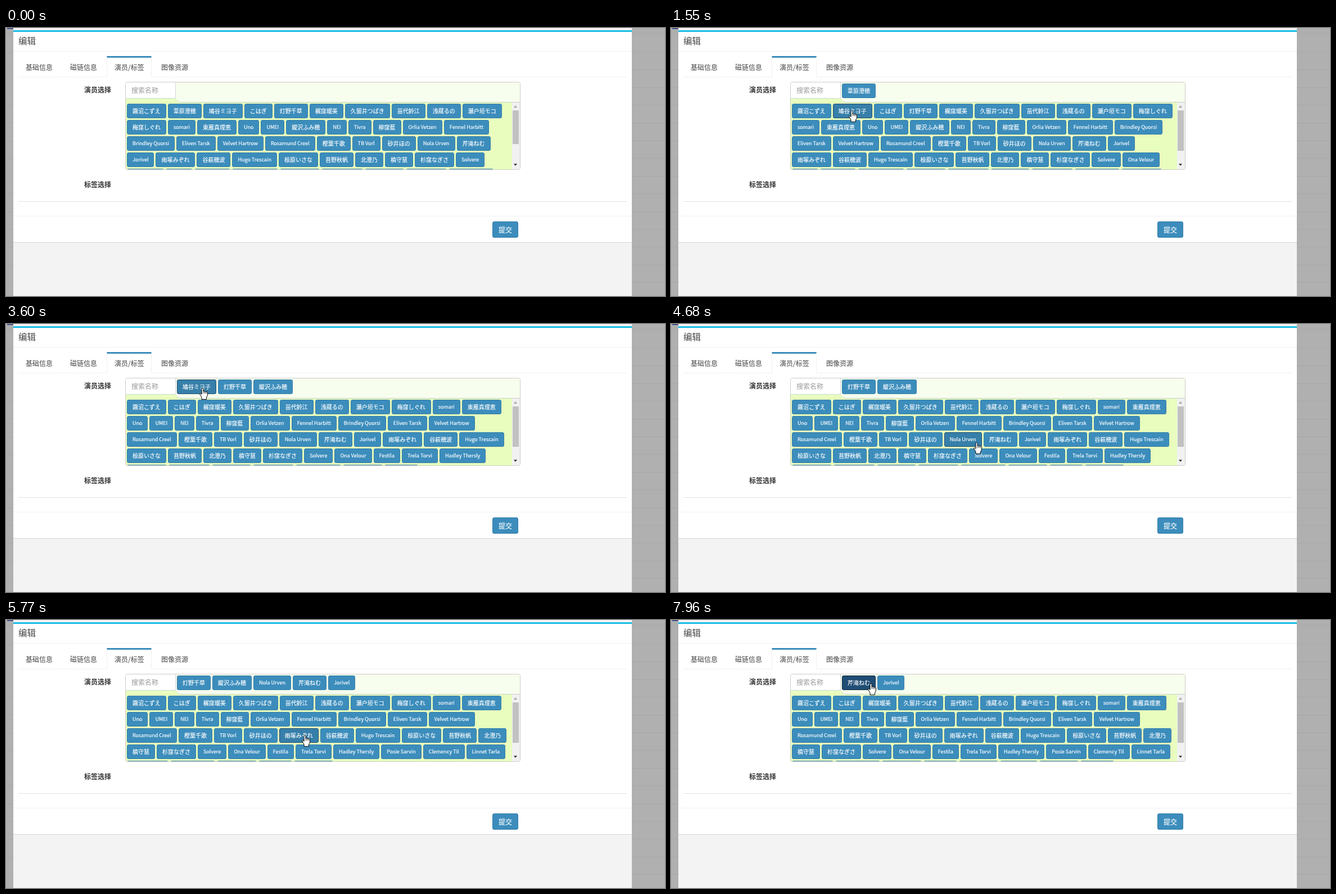
An HTML page that plays this animation: 1172 by 478 pixels, repeating every 8000 ms.

```html
<!DOCTYPE html>
<html lang="zh-CN">
<head>
<meta charset="utf-8">
<title>编辑</title>
<style>
html, body { margin: 0; width: 100%; height: 100%; overflow: hidden; }
body {
  position: relative;
  font: 12px/20px "Noto Sans CJK SC", "Noto Sans CJK JP", "Noto Sans CJK", sans-serif;
  color: #444;
  background: repeating-linear-gradient(#a8a8a8 0 1px, #b0b0b0 1px 31.6px) 0 11px;
}
body * { position: absolute; box-sizing: border-box; white-space: nowrap; }
script { display: none; }
.scrap { left: 2px; top: 0; width: 11px; height: 2px; background: #46538a; }
.page { left: 13px; top: 0; width: 1100px; height: 478px; background: #f3f3f3; }
.card {
  left: 13px; top: 4px; width: 1100px; height: 379px; background: #fff;
  border-top: 3px solid #18bfe6; border-bottom: 1px solid #d6d6d6;
}
.rule { height: 1px; background: #f1f1f1; }
.wide { left: 13px; width: 1100px; }
.inner { left: 22px; width: 1082px; }
.title { left: 22px; top: 12px; font-size: 15.5px; }
.tab { left: 179px; top: 50px; width: 80px; height: 38px; background: #fff;
  border: 1px solid #f1f1f1; border-top: 3px solid #3c8dbc; border-bottom: 0; }
.label { left: 139px; color: #333; font-weight: 700; }
.btn {
  position: relative; flex: none; height: 26px; padding: 0 9px; text-align: center;
  font: 10px/24px "Noto Sans CJK JP", "Noto Sans CJK SC", "Noto Sans CJK", sans-serif;
  -webkit-text-stroke: .2px #fff;
  color: #fff; background: #3c8dbc; border: 1px solid #367fa9; border-radius: 3px;
}
.latin { font-size: 9px; }
.hover { background: #367fa9; border-color: #204d74; }
.down { background: #204d74; border-color: #122b40; }
.submit { position: absolute; left: 865px; top: 345px; width: 46px; height: 29px; font-size: 12px; line-height: 27px; }
.picker { left: 212px; top: 96px; width: 703px; height: 157px; overflow: hidden;
  background: #e8fdbe; border: 1px solid #ccc; border-radius: 4px; }
.search { left: 0; top: 0; width: 89px; height: 29px; padding-left: 10px; line-height: 27px;
  background: #fff; border: 1px solid #d2d6de; border-width: 0 1px 1px 0; color: #999; }
.chosen, .list { display: flex; gap: 3px; }
.chosen { left: 89px; top: 0; width: 612px; height: 36px; padding: 2px;
  background: #f7feee; border-bottom: 1px solid #ccc; border-bottom-left-radius: 9px; }
.list { left: 2px; top: 36px; width: 678.5px; height: 119px; padding: 2px 0 5px;
  flex-wrap: wrap; align-content: flex-start; overflow: hidden; }
.bar { left: 687px; top: 36px; width: 14px; height: 119px; background: #f1f1f1; }
.thumb { left: 1px; top: 14px; width: 11px; background: #c1c1c1; }
.arrow { left: 3px; border: solid transparent; border-width: 0 3.5px; }
.up { top: 5px; border-bottom: 4px solid #a3a3a3; }
.dn { top: 109px; border-top: 4px solid #404040; }
.cursor { left: -5px; top: 0; width: 16px; height: 22px; pointer-events: none; overflow: visible; }
</style>
</head>
<body>
<div class="scrap"></div>
<div class="page"></div>
<div class="card"></div>
<div class="title">编辑</div>
<div class="rule wide" style="top:41px"></div>
<div class="rule inner" style="top:87px"></div>
<div class="tab"></div>
<div style="left:35px;top:60px">基础信息</div>
<div style="left:114px;top:60px">磁链信息</div>
<div style="left:193px;top:60px">演员/标签</div>
<div style="left:276px;top:60px">图像资源</div>
<div class="label" style="top:100px">演员选择</div>
<div class="label" style="top:269px">标签选择</div>
<div class="rule inner" style="top:309px;background:#e0e0e0"></div>
<div class="rule wide" style="top:335px"></div>
<div class="btn submit">提交</div>
<div class="picker">
  <div class="chosen"></div>
  <div class="search">搜索名称</div>
  <div class="list"></div>
  <div class="bar"><div class="arrow up"></div><div class="thumb"></div><div class="arrow dn"></div></div>
</div>
<svg class="cursor" viewBox="0 0 16 22">
  <path fill="#fff" stroke="#000" stroke-linejoin="round" d="M5.5.6C4.5.6 4 1.4 4 2.2V11.5L2.6 10C1.8 9.2.6 9.8.6 10.9L4 16.8V20.4H12.4V17.2L14.4 13.4V8C14.4 6.6 12.3 6.4 12 7.4C11.8 6 9.8 5.8 9.5 6.8C9.2 5.5 7.2 5.5 7 6.2V2.2C7 1.4 6.5.6 5.5.6Z"/>
  <path fill="none" stroke="#000" stroke-width=".8" d="M7 6V10M9.5 6.8V10M12 7.4V10.5"/>
</svg>
<script>
const LOOP = 8000, STEP = 70;

const NAMES = `霧沼こずえ,葦原澄穂,鳩谷ミヨ子,こはぎ,灯野千草,梶窪瑠美,久留井つばき,苗代鈴江,浅蔵るの,瀬戸垣モコ,
梅窪しぐれ,somari,東雁真理恵,Uno,UMEI,縦沢ふみ穂,NEI,Tivra,柳窪藍,Orlia Vetzen,Fennel Harbitt,
Brindley Quorsi,Eliven Tarsk,Velvet Hartrow,Rosamund Creel,樫葉千歌,TB Vorl,砂井ほの,Nola Urven,芹滝ねむ,
Jorivel,雨塚みぞれ,谷萩穂波,Hugo Trescain,椋原いさな,苔野秋帆,北澄乃,槙守慧,杉窪なぎさ,Solvere,
Ona Velour,Festila,Trela Torvi,Hadley Thersly,Posie Sarvin,Clemency Til,Linnet Tarla,
Fable Rowan,Isolde Marvick,Tansy Quillo`.split(/,\s*/);

// Where the cursor tip rests, and when the mouse is pressed there.
const ENTRY = { x: 1286, y: 545 };
const STOPS = [
  [321, 147, 1420, 1750], [359, 147, 2490], [340, 174, 2900], [349, 114, 3520, 3800],
  [543, 211, 4950, 5290], [531, 205, 5700], [470, 114, 6530], [395, 114, 6880], [355, 113, 7470, 7960]
];

const $ = s => document.querySelector(s);
const list = $('.list'), chosen = $('.chosen'), thumb = $('.thumb'), cursor = $('.cursor');
const buttonAt = (x, y) => document.elementFromPoint(x, y)?.closest('.btn');

function makeButton(name) {
  const el = document.createElement('div');
  el.className = /^[ -~]+$/.test(name) ? 'btn latin' : 'btn';
  el.textContent = name;
  return el;
}

const presses = STOPS.flatMap(([x, y, ...times]) =>
  times.map(time => ({ x, y, time, release: time + STEP })));

// Each move fills the middle part of the pause between two clicks.
let free = 0;
const moves = STOPS.map(([x, y, ...times]) => {
  const pause = times[0] - free;
  const move = { x, y, from: free + pause * .325, to: times[0] - pause * .26 };
  free = times.at(-1) + STEP;
  return move;
});

function tipAt(t) {
  let { x, y } = ENTRY;
  for (const m of moves) {
    if (t < m.from) break;
    const elapsed = (Math.floor((t - m.from) / STEP) + 1) * STEP;
    const ease = 1 - (1 - Math.min(1, elapsed / (m.to - m.from))) ** 2;
    x += (m.x - x) * ease;
    y += (m.y - y) * ease;
  }
  return [Math.round(x), Math.round(y)];
}

let shown = null;
function show(state) {
  if (state === shown) return;
  shown = state;
  list.replaceChildren(...state.left);
  chosen.replaceChildren(...state.picked);
  thumb.style.height = Math.round(90 * 119 / list.scrollHeight) + 'px';
}

// A click sends a button to the end of the other group.
function toggle({ left, picked }, el) {
  const others = group => group.filter(b => b !== el);
  return picked.includes(el)
    ? { left: [...left, el], picked: others(picked) }
    : { left: others(left), picked: [...picked, el] };
}

const states = [{ left: NAMES.map(makeButton), picked: [] }];
for (const { x, y } of presses) {
  const state = states.at(-1);
  show(state);
  const el = buttonAt(x, y);
  states.push(el ? toggle(state, el) : state);
}

let hot = null;
function draw(t) {
  show(states[presses.filter(p => p.release <= t).length]);
  const visible = t >= moves[0].from;
  const [x, y] = tipAt(t);
  cursor.style.visibility = visible ? 'visible' : 'hidden';
  cursor.style.transform = `translate(${x}px, ${y}px)`;
  hot?.classList.remove('hover', 'down');
  hot = visible ? buttonAt(x, y) : null;
  const pressed = presses.some(p => t >= p.time && t < p.release);
  hot?.classList.add(pressed ? 'down' : 'hover');
}

const began = performance.now();
function tick() {
  draw((performance.now() - began) % LOOP);
  requestAnimationFrame(tick);
}
tick();
</script>
</body>
</html>
```
